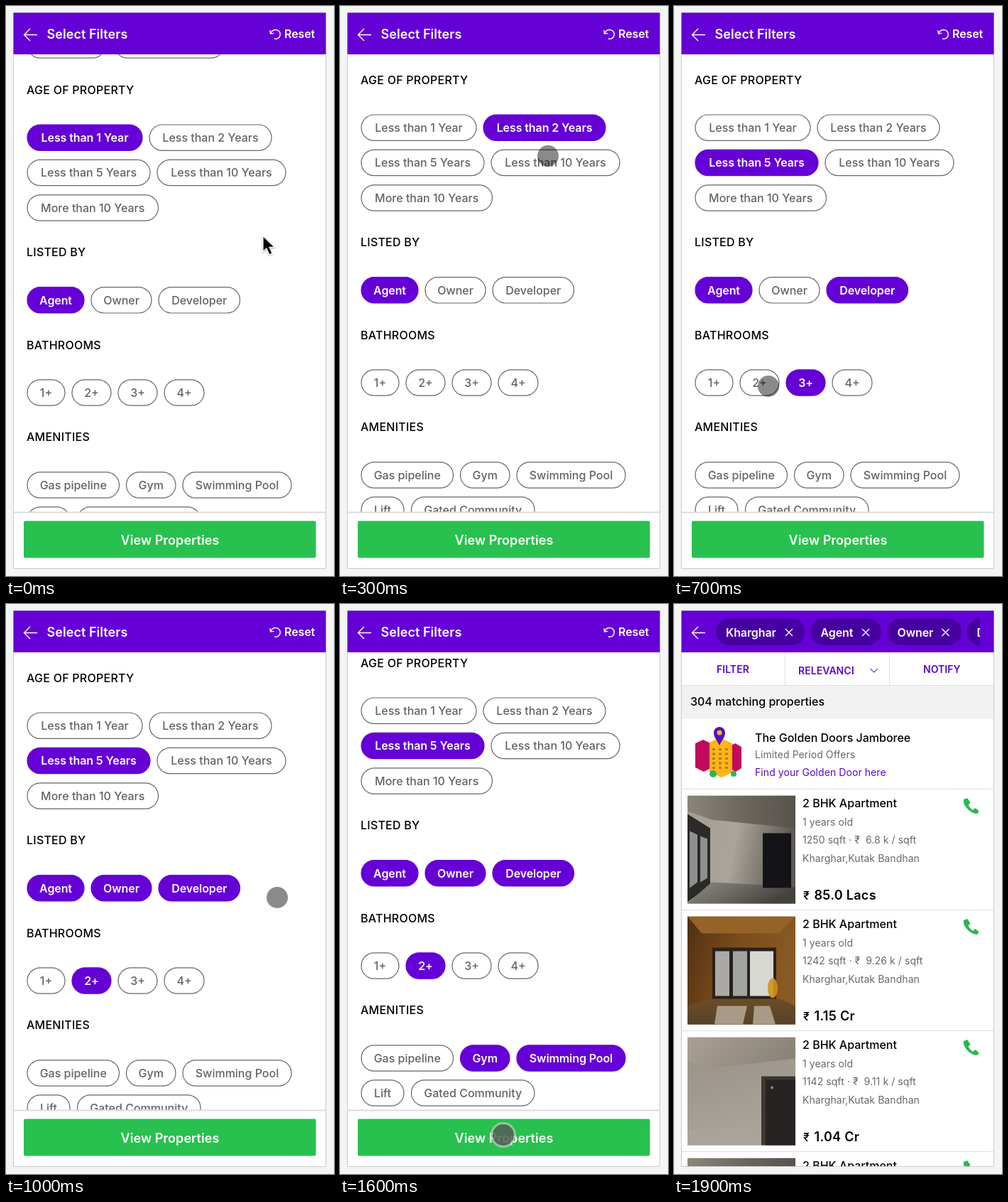
An HTML page that plays this animation: 462 px wide and 802 px high, repeating every 2 s.

```html
<!DOCTYPE html>
<html lang="en">
<head>
<meta charset="utf-8">
<title>Property filters</title>
<style>
  html, body { margin: 0; width: 100%; height: 100%; overflow: hidden; background: #f3f5f5; }
  svg { display: block; width: 462px; height: 802px; }
  text { font: 500 16px Inter, sans-serif; letter-spacing: 0; white-space: pre; }
  .head { letter-spacing: .25px; }
  .title { font-size: 18px; font-weight: 600; letter-spacing: .05px; fill: #fff; }
  .bold { font-weight: 600; letter-spacing: -.1px; fill: #fff; }
  .tab { font-size: 14px; font-weight: 600; letter-spacing: .05px; fill: #5c06c6; }
  .small { font-size: 14px; font-weight: 400; letter-spacing: .07px; fill: #686868; }
  .link { fill: #5c06c6; }
  .price { font-size: 18px; font-weight: 600; letter-spacing: .3px; }
  .mid { text-anchor: middle; }
  .chip rect { fill: #fff; stroke: #666; stroke-width: 1.2; }
  .chip text { fill: #636363; text-anchor: middle; }
  .chip.on rect { fill: #6500d6; stroke: #6500d6; }
  .chip.on text { fill: #fff; font-weight: 600; letter-spacing: -.1px; }
  .line { fill: none; stroke: #fff; stroke-width: 1.4; }
  .rule { fill: none; stroke: #dedede; }
  #arrow { stroke: #fff; stroke-width: 1.2; filter: drop-shadow(0 1px 1px rgba(0, 0, 0, .35)); }
</style>
</head>
<body>
<svg id="stage" viewBox="0 0 462 802"></svg>
<script>
const STEP = 100, STEPS = 20, END = STEPS;
const PURPLE = '#6500d6';

// label, left, right, middle y, first step on, step off
const chips = [
  ['', 30, 140, 55], ['', 153, 307, 55],
  ['Less than 1 Year', 30, 192, 185.2, 0, 2],
  ['Less than 2 Years', 202, 374, 185.2, 2, 4],
  ['Less than 5 Years', 30, 203, 234.5, 4, END],
  ['Less than 10 Years', 213, 394, 234.5],
  ['More than 10 Years', 30, 214.5, 284],
  ['Agent', 30, 110, 413.8, 0, END],
  ['Owner', 120, 205, 413.8, 9, END],
  ['Developer', 215, 329.5, 413.8, 5, END],
  ['1+', 30, 83, 544],
  ['2+', 93, 148, 544, 8, END],
  ['3+', 158, 213, 544, 6, 8],
  ['4+', 223, 279, 544],
  ['Gas pipeline', 30, 159.5, 674],
  ['Gym', 169.5, 239, 674, 13, END],
  ['Swimming Pool', 249, 402, 674, 14, END],
  ['Lift', 30, 90, 723],
  ['Gated Community', 100.5, 274, 723]
];
const heads = [['AGE OF PROPERTY', 117.5], ['LISTED BY', 346], ['BATHROOMS', 476.5], ['AMENITIES', 606]];

const homes = [
  ['1250', '6.8', '85.0 Lacs'], ['1242', '9.26', '1.15 Cr'],
  ['1142', '9.11', '1.04 Cr'], ['1250', '6.8', '85.0 Lacs']
];

// pointer place for each step after the first
const dots = [
  [326, 238], [288, 174], [293, 211], [125, 222], [272, 402], [186, 532],
  [133, 535], [121, 532], [163, 402], [382, 413], [330, 520], [203, 640],
  [216, 640], [325, 640], [290, 690], [230, 747], [230, 747]
];

const text = (s, x, y, cls = '', extra = '') => `<text class="${cls}" x="${x}" y="${y}" ${extra}>${s}</text>`;
const rect = (x, y, w, h, fill, r = 0) => `<rect x="${x}" y="${y}" width="${w}" height="${h}" rx="${r}" fill="${fill}"/>`;
const path = (d, attrs) => `<path d="${d}" ${attrs}/>`;
const shape = (d, fill) => path(d, `fill="${fill}"`);
const line = d => path(d, 'class="line"');
const rule = d => path(d, 'class="rule"');
const blob = (x, y, rx, ry, fill, a = 1) => `<ellipse cx="${x}" cy="${y}" rx="${rx}" ry="${ry}" fill="${fill}" opacity="${a}"/>`;
const fade = (id, x, y, ...colors) => `<linearGradient id="${id}" x2="${x}" y2="${y}">` +
  colors.map((c, i) => `<stop offset="${i / (colors.length - 1)}" stop-color="${c}"/>`).join('') + '</linearGradient>';
const clip = (id, x, y, w, h) => `<clipPath id="${id}">${rect(x, y, w, h, '#000')}</clipPath>`;

function chip([label, x1, x2, y]) {
  return `<g class="chip">${rect(x1, y - 18.2, x2 - x1, 36.4, '', 18.2)}` +
    text(label, (x1 + x2) / 2, y + 5.8) + '</g>';
}

function filterPage() {
  return `<g id="filters"><g clip-path="url(#body)"><g id="scroll">` +
    heads.map(([s, y]) => text(s, 29, y + 6, 'head')).join('') + chips.map(chip).join('') + '</g></g>' +
    text('Select Filters', 57.5, 46, 'title') + text('Reset', 392, 44.5, 'bold') +
    line('M372.5 39C374 35 377 33.5 380 33.5A6.4 6.4 0 1 1 378 46M371.8 34.2L372.5 39L377.4 38.4') +
    path('M11 712.5H450', 'stroke="#dcdcdc" stroke-width="2"') +
    rect(25, 724.5, 411.5, 52, '#28c14f', 2) + text('View Properties', 231, 758, 'title mid') + '</g>';
}

function tag(label, x, w, cross) {
  return rect(x, 20.5, w, 37.5, '#4700a0', 18.7) + text(label, x + 14, 45.5, 'bold') +
    line(`M${cross - 5} 35l10 10m0-10l-10 10`);
}

const rooms = [
  () => rect(0, 0, 152, 152, 'url(#wall1)') + shape('M0 0H152V46L34 34L0 22Z', 'url(#roof1)') +
    shape('M0 26L32 46V126L0 150Z', '#2b2a29') +
    shape('M3 50L14 55V122L3 130ZM18 57L28 61V116L18 122Z', '#8d908e') +
    shape('M34 122L152 128V152H0Z', 'url(#floor1)') + rect(106, 53, 40, 77, '#141318'),
  () => rect(0, 0, 152, 152, 'url(#wall2)') + shape('M0 0H152L128 24H20Z', '#956228') +
    shape('M0 126L32 116H130L152 126V152H0Z', 'url(#floor2)') +
    shape('M42 126H84L78 152H38ZM94 126H116L124 152H92Z', '#a89a86') +
    rect(35, 44, 90, 72, '#2a211a') +
    rect(39, 49, 20, 63, '#a9aaa5') + rect(64, 49, 20, 63, '#a2a4a2') + rect(88, 49, 33, 63, '#d8d8d3') +
    blob(120, 101, 7, 14, '#d0921a', .9),
  () => rect(0, 0, 152, 152, 'url(#wall3)') + shape('M0 0H152V30L30 44L0 34Z', 'url(#roof3)') +
    shape('M0 130L104 127V152H0Z', '#a9a39a') + rect(104, 55, 48, 97, '#3d3732') + rect(110, 60, 42, 92, '#262322') +
    blob(119, 71, 2, 2, '#8c8379')
];

function home([area, rate, cost], i) {
  return `<g transform="translate(0 ${i * 170})"><svg class="room" x="19" y="269.5" width="152" height="152.5">${rooms[i % 3]()}</svg>` +
    text('2 BHK Apartment', 181, 286) + text('1 years old', 181, 311.7, 'small') +
    text(`${area} sqft · ₹\u00a0 ${rate} k / sqft`, 181, 336.8, 'small') +
    text('Kharghar,Kutak Bandhan', 181, 362.7, 'small') +
    text('₹', 182, 416, 'head') + text(cost, 197.5, 416.3, 'price') +
    shape('M408 275L413 273L417.5 279.5L414.5 282.5C416 286 418 288 421 290L424 287L429.5 291L428 294.5C420 297 406 284 408 275Z', '#28b84e') +
    rule('M11 430.5H450') + '</g>';
}

function carnival() {
  let s = shape('M30 196L41 191L52 196V231L42 236L30 230Z', '#c20a5c') +
    shape('M77 201L86 196L95 201V231L87 236L77 231Z', '#c20a5c') +
    shape('M50 195L64 188L82 196V237L67 244L50 237Z', '#fbb615');
  for (let i = 0; i < 15; i++) s += rect(54 + i % 3 * 9, 203 + Math.floor(i / 3) * 6.5, 4, 3, '#bd752b');
  return s + blob(55, 239, 5, 5, '#29b65a') + blob(84, 239, 4, 4, '#29b65a') +
    shape('M64 199C61 192 56 188 56 181A8 8 0 0 1 72 181C72 188 67 192 64 199Z', '#5012bd') +
    blob(64, 181, 3.5, 3.5, '#fbb615');
}

function resultPage() {
  return `<g id="results" clip-path="url(#page)">` + rect(11, 68, 439, 724, '#fff') +
    '<g clip-path="url(#tags)">' + tag('Kharghar', 59, 125.5, 162) + tag('Agent', 192.5, 99.5, 270) +
    tag('Owner', 300.5, 104.5, 382.5) + tag('Developer', 412.5, 130, 525) + '</g>' +
    text('FILTER', 60, 96.5, 'tab') + text('RELEVANCE', 175, 99, 'tab', 'clip-path="url(#sort)"') + text('NOTIFY', 351, 96.5, 'tab') +
    path('M276.5 91L281.7 96L287 91', 'fill="none" stroke="#7a3ad0" stroke-width="1.2"') +
    rule('M156.5 68V114M303.5 68V114') + rect(11, 114, 439, 47.5, '#f1f1f1') + rule('M11 114.5H450') +
    text('304 matching properties', 23, 143) + carnival() +
    text('The Golden Doors Jamboree', 114, 194) + text('Limited Period Offers', 114, 217, 'small') +
    text('Find your Golden Door here', 114, 241.7, 'small link') + rule('M11 260.5H450') +
    homes.map(home).join('') + '</g>';
}

const stage = document.getElementById('stage');
stage.innerHTML = '<defs>' + clip('body', 11, 68, 439, 644) + clip('page', 11, 9, 439, 782) +
  clip('tags', 50, 10, 381, 57) + clip('sort', 170, 80, 83, 30) +
  fade('wall1', 1, .2, '#a39e95', '#aaa49a', '#5d5952') + fade('roof1', 1, 0, '#8a867c', '#6c6860', '#57534c') +
  fade('floor1', 1, .4, '#8d8983', '#6e6a65', '#45413d') +
  fade('wall2', 1, .3, '#4f3013', '#7b4c1b', '#8a5a24') + fade('floor2', 0, 1, '#6c4c27', '#57422b') +
  fade('wall3', .3, 1, '#958f86', '#aaa49b') + fade('roof3', 1, .3, '#aaa195', '#8b8479') + '</defs>' +
  rect(0, 0, 462, 802, '#f3f5f5') + rect(10.5, 9, 440, 782.5, '#fff') +
  path('M10.5 9.5H450.5V791.5H10.5Z', 'fill="none" stroke="#cacccc"') + rect(10.5, 9.5, 440, 58.5, PURPLE) +
  filterPage() + resultPage() + line('M44 40.5H25.5M34 32L25.5 40.5L34 49') +
  path('M362 323.5v22l5-4.6 4 9 4-1.8-4-8.8h7.2z', 'id="arrow"') +
  `<g id="dot">${blob(0, 0, 18, 18, '#b9c9b9', .75)}${blob(0, 0, 15, 15, '#000', .46)}</g>`;

const $ = id => document.getElementById(id);
const chipNodes = [...stage.querySelectorAll('.chip')];
const roomNodes = [...stage.querySelectorAll('.room')];
const show = (node, yes) => node.setAttribute('display', yes ? 'inline' : 'none');
const scrollAt = n => n < 1 ? 0 : n < 11 ? 14 : 35;

function draw(time) {
  const n = Math.floor(time / STEP) % STEPS;
  const done = n >= 18;
  const spot = dots[n - 1];
  show($('filters'), !done);
  show($('results'), done);
  show($('arrow'), n === 0);
  show($('dot'), !!spot);
  $('scroll').setAttribute('transform', `translate(0 ${-scrollAt(n)})`);
  chips.forEach(([, , , , on, off], i) => chipNodes[i].classList.toggle('on', n >= on && n < off));
  roomNodes.forEach(r => r.setAttribute('opacity', n === 18 ? .5 : 1));
  if (spot) {
    $('dot').setAttribute('transform', `translate(${spot})`);
    show($('dot').firstChild, n >= 16);
  }
}

const start = performance.now();
function tick() {
  draw(performance.now() - start);
  requestAnimationFrame(tick);
}
tick();
</script>
</body>
</html>
```
